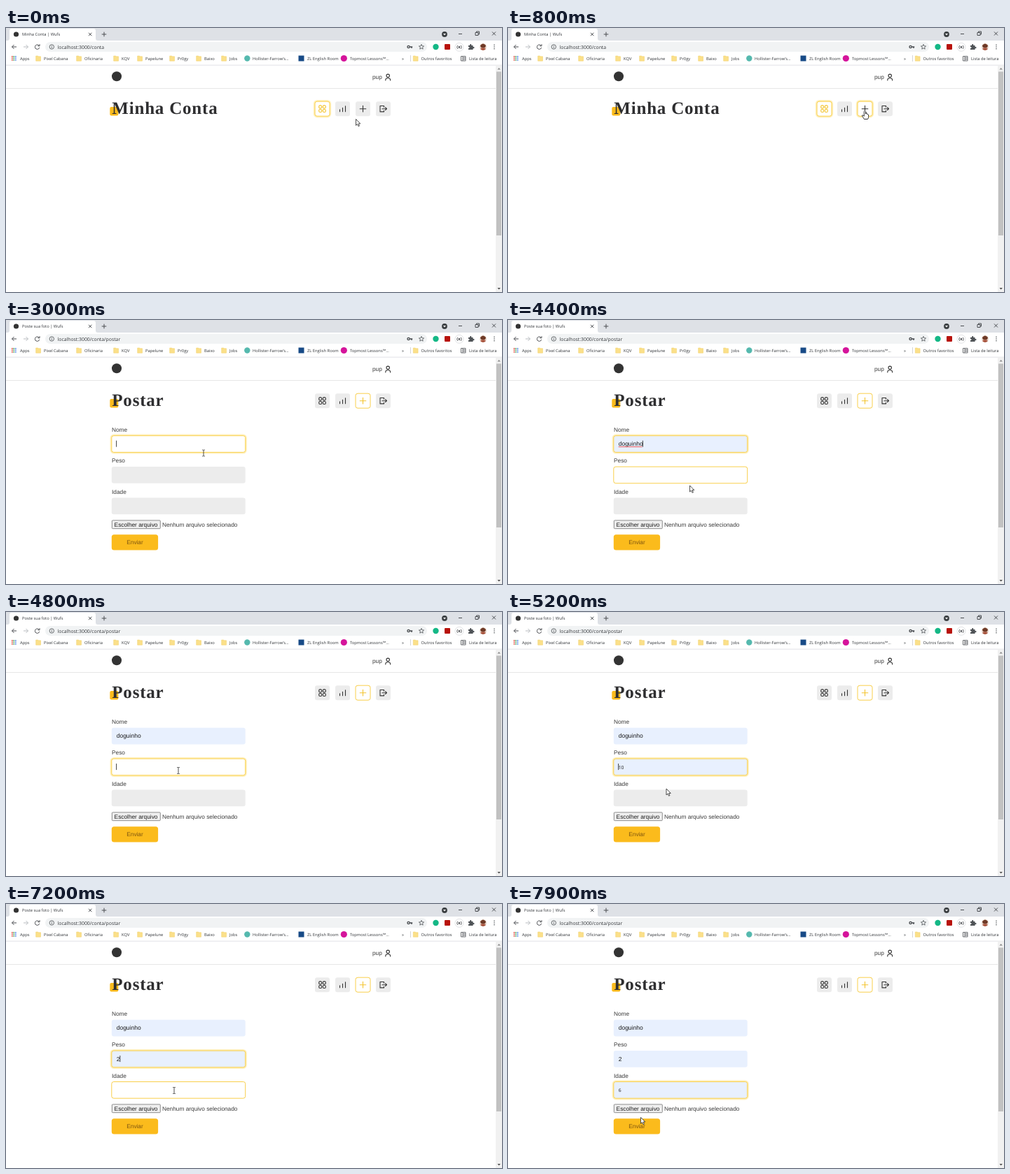
Animation, 708 px wide and 378 px high, one loop 8000 ms. Source, as an HTML page:

```html
<!DOCTYPE html>
<html lang="pt-BR">
<head>
<meta charset="utf-8">
<title>Minha Conta</title>
<style>
html, body { margin: 0; width: 100%; height: 100%; overflow: hidden; background: #fff; }
svg { display: block; width: 708px; height: 378px; }
text { text-rendering: geometricPrecision; white-space: pre; }
.ui { font: 5.8px "Open Sans", "Noto Sans", sans-serif; fill: #33363a; }
.url { font-size: 6.85px; }
.page { font: 8.3px "Liberation Sans", Arial, sans-serif; fill: #3a3a3a; }
.val { font-size: 8.5px; fill: #1a1a1a; }
.val.preview { font: 6.8px "Open Sans", "Noto Sans", sans-serif; }
.title { font: bold 25px "Liberation Serif", "Times New Roman", serif; letter-spacing: .8px; fill: #2e2e30; }
.line { fill: none; stroke: #4a4d51; stroke-width: 1; }
.thin { stroke-width: .8; }
.icon { fill: none; stroke: currentColor; stroke-width: 1.1; stroke-linecap: round; stroke-linejoin: round; }
.nav { color: #333; }
.nav .box, .field .box { fill: #ececec; }
.ring, .glow { fill: none; visibility: hidden; }
.ring { stroke: #f9cf4a; }
.glow { stroke: #fff0bd; stroke-width: 3; }
.hover .box, .focus .box, .active .box { fill: #fff; }
.auto .box { fill: #e8f0fe; }
.hover .ring, .focus .ring, .active .ring, .focus .glow { visibility: visible; }
.active { color: #f3c42f; }
.fading { color: #f7d06a; }
</style>
</head>
<body>
<svg viewBox="0 0 708 378">
  <rect width="708" height="378" fill="#fff"/>
  <rect width="708" height="18" fill="#dee1e6"/>
  <path d="M2 18Q5 18 5 15V4Q5 1 8 1H125Q128 1 128 4V15Q128 18 131 18Z" fill="#fff"/>
  <circle cx="14.5" cy="9" r="3.6" fill="#333"/>
  <text class="ui" id="tab" x="23" y="11.2"></text>
  <g class="line">
    <path d="M118 6.8l4.4 4.4m0-4.4l-4.4 4.4M136.7 9h6.6M140 5.7v6.6M646 8.5h5M670 6.5h4v4h-4zM671.5 6.5v-1.5h4v4h-1.5M694 5.5l5 5m0-5l-5 5"/>
    <path d="M15 27H8.5m3-3l-3 3 3 3"/>
    <path d="M25 27h6.5m-3-3l3 3-3 3" stroke="#b9bcc0"/>
    <path d="M47.2 25.3A3.2 3.2 0 1 0 47.7 28M48 23.2v2.6h-2.6"/>
  </g>
  <circle cx="626" cy="9" r="3.9" fill="#3c4043"/>
  <path d="M624 8h4l-2 2.6z" fill="#fff"/>
  <rect x="56" y="20" width="545" height="14" rx="7" fill="#f1f3f4"/>
  <g class="line thin">
    <circle cx="65.3" cy="27" r="3.2"/>
    <path d="M65.3 26.4v2.4M65.3 24.8v.8"/>
    <circle cx="574.6" cy="27" r="1.6" stroke-width="1.4"/>
    <path d="M576.2 27h4M579 27v2" stroke-width="1.4"/>
    <path d="M593 23.4l1 2.4 2.6.2-2 1.7.6 2.5-2.2-1.4-2.2 1.4.6-2.5-2-1.7 2.6-.2z"/>
  </g>
  <text class="ui url" id="url" x="73.6" y="29.5"></text>
  <circle cx="613.5" cy="27" r="4.2" fill="#15b886"/>
  <rect x="626" y="23" width="8" height="8" rx="1" fill="#b8120b"/>
  <circle cx="647" cy="27.3" r="6" fill="#fff" stroke="#d5d7da" stroke-width=".7"/>
  <text class="ui" x="647" y="29.2" text-anchor="middle" style="font-weight:bold">(x)</text>
  <path d="M660 25h2q-.5-2 1.2-2t1.2 2h2.2v2q2-.4 2 1t-2 1.2V31H660v-2q1.6.2 1.6-1T660 27z" fill="#4f5357"/>
  <circle cx="681" cy="27" r="5" fill="#ead9cd"/>
  <path d="M677 25q4-5 8 0l-1 3h-6z" fill="#6e3a27"/>
  <path d="M677 30q4-4 8 0-4 4-8 0" fill="#a8553f"/>
  <g fill="#4f5357"><circle cx="697" cy="24.3" r=".8"/><circle cx="697" cy="27" r=".8"/><circle cx="697" cy="29.7" r=".8"/></g>
  <g id="marks"></g>
  <circle cx="344.3" cy="43.5" r="4.2" fill="#55b9ae"/>
  <rect x="417.5" y="39.5" width="8" height="8" fill="#174a86"/>
  <circle cx="482.3" cy="43.5" r="4.6" fill="#d5149b"/>
  <path d="M577.5 39v9" stroke="#ccc" stroke-width=".8"/>
  <path class="line thin" d="M649.5 40.5h6.5v6.5h-6.5zM652 40.5V47M652 42.6h4M652 44.8h4"/>
  <path d="M0 53.2H708" stroke="#dadce0" stroke-width=".8"/>
  <path d="M0 86.5H699" stroke="#e6e6e6"/>
  <rect x="699" y="53.6" width="9" height="324.4" fill="#f1f1f1"/>
  <rect x="700" y="62.5" width="7" height="234.5" fill="#c1c1c1"/>
  <path d="M701.5 59.5l2.2-2.5 2.2 2.5z" fill="#8a8a8a"/>
  <path d="M701.5 372l2.2 2.5 2.2-2.5z" fill="#505050"/>

  <circle cx="158" cy="69.3" r="7" fill="#333"/>
  <text class="page" x="523" y="72.8">pup</text>
  <g class="icon" color="#333"><circle cx="545.2" cy="68.3" r="2.2"/><path d="M541.8 75v-.6q0-2.7 3.4-2.7t3.4 2.7v.6"/></g>
  <rect x="148.3" y="113" width="12" height="12.5" rx="2" fill="#fbbb1c"/>
  <text class="title" id="title" x="151.3" y="123"></text>
  <g id="nav"></g>
  <g id="form">
    <g id="fields"></g>
    <rect x="151.3" y="286.9" width="69" height="11.8" rx="1" fill="#efefef" stroke="#808080" stroke-width=".9"/>
    <text class="page" x="154.6" y="295.6" style="fill:#1a1a1a">Escolher arquivo</text>
    <text class="page" x="223" y="295.6">Nenhum arquivo selecionado</text>
    <rect x="150.8" y="307.2" width="66.3" height="22.3" rx="3.5" fill="#fbbb1c"/>
    <text class="page" x="184" y="321.4" text-anchor="middle" style="fill:#7d5510">Enviar</text>
  </g>
  <g id="pointer">
    <path id="arrow" d="M0 0V9L2 7.1 3.5 10.3 5 9.6 3.5 6.5H6.3Z" fill="#fff" stroke="#222" stroke-width=".8"/>
    <path id="hand" d="M-1.2 1Q0-.8 1 1V4.5Q2-.0 2.6 4.6 3.7 4 4 5.3 5.1 5 5.1 6.4V9Q5 10.5 4 12H-1.2Q-2 10-4 7.5-4.3 6-2.7 6.4L-1.2 7.7Z" fill="#fff" stroke="#222" stroke-width=".9" stroke-linejoin="round"/>
    <path id="beam" d="M-1.8-4.5H-.5L0-4 .5-4.5H1.8M0-4V4M-1.8 4.5H-.5L0 4 .5 4.5H1.8" fill="none" stroke="#222" stroke-width=".8"/>
  </g>
</svg>
<script>
const LOOP = 8000, TICK = 100;
const $ = id => document.getElementById(id);

// Bookmarks: label, text x, folder icon?
$('marks').innerHTML = [
  ['Apps', 20], ['Pixel Cabana', 54, 1], ['Oficinaria', 112, 1], ['KQV', 165, 1],
  ['Papelune', 199, 1], ['Pr0gy', 245, 1], ['Baixo', 283, 1], ['Jobs', 319, 1],
  ['Hollister-Farrow’s...', 352], ['ZL English Room', 430], ['Topmost Lessons™...', 491],
  ['»', 565], ['Outros favoritos', 592.6, 1], ['Lista de leitura', 661]
].map(([label, x, folder]) =>
  (folder ? `<path d="M${x - 11.3} 40h3l.6.8h3.2v6.4h-6.8z" fill="#fbe08a" stroke="#efcd62" stroke-width=".5"/>` : '') +
  `<text class="ui" x="${x}" y="45.6">${label}</text>`).join('');
for (let i = 0; i < 9; i++)
  $('marks').innerHTML += `<rect x="${8 + i % 3 * 2.5}" y="${40 + (i / 3 | 0) * 2.5}" width="1.6" height="1.6" fill="${['#e0483a', '#3f9b58', '#4d84e8'][i % 3]}"/>`;

// A filled box with the outlines it gets on hover and focus
const rect = (cls, x, y, w, h, r) => `<rect class="${cls}" x="${x}" y="${y}" width="${w}" height="${h}" rx="${r}"/>`;
const frameBox = (x, y, w, h) => rect('glow', x - .7, y - .7, w + 1.4, h + 1.4, 4) +
  rect('box', x, y, w, h, 3) + rect('ring', x, y, w, h, 3);

// Icons are drawn around the middle of a 21 px button
const tile = (x, y) => `<rect x="${x}" y="${y}" width="4" height="4" rx="1.5"/>`;
const icons = [
  tile(-4.8, -4.8) + tile(.8, -4.8) + tile(-4.8, .8) + tile(.8, .8),
  '<path d="M-4 4V1M0 4V-1.5M4 4V-4"/>',
  '<path d="M-4.3 0H4.3M0-4.3V4.3"/>',
  '<path d="M1-2.5V-4.2H-4.5V4.2H1V2.5M-1.5 0H5M3-2L5 0 3 2"/>'
];
$('nav').innerHTML = icons.map((icon, i) => `<g class="nav" id="nav${i}" transform="translate(${451.5 + i * 29} 115.7)">
  ${frameBox(-10.5, -10.5, 21, 21)}<g class="icon">${icon}</g></g>`).join('');

$('fields').innerHTML = ['Nome', 'Peso', 'Idade'].map((label, i) => {
  const y = 165.7 + i * 44.4;
  return `<text class="page" x="151" y="${y - 6}">${label}</text>
  <g class="field" id="field${i}" transform="translate(151 ${y})">
  ${frameBox(-.2, 0, 190.9, 23.7)}
  <text class="page val" x="6.7" y="14.5"></text>
  <path class="wave" d="M6.7 15.9H40.5" stroke="#e33" stroke-width=".8"/>
  <path class="caret" stroke="#111" stroke-width=".8"/></g>`;
}).join('');

// [time, classes, value, caret x, misspelt?]
const fields = [
  [[0, ''], [2600, 'hover'], [2800, 'focus'], [2900, 'focus', '', 6.6],
   [3500, 'focus auto preview', 'doguinho', 6.6], [3900, 'focus auto', 'doguinho', 41.4, 1],
   [4800, 'auto', 'doguinho']],
  [[0, ''], [4200, 'hover'], [4500, ''], [4600, 'hover'], [4800, 'focus', '', 6.6],
   [5000, 'focus auto preview', '10', 6.6], [5400, 'focus auto preview', '10'],
   [5700, 'focus auto preview', '10', 6.6], [5900, 'focus auto preview', '5', 6.6],
   [6300, 'focus auto preview', '2', 6.6], [6500, 'focus auto preview', '2'],
   [6800, 'focus auto', '2', 11.8], [7300, 'auto', '2']],
  [[0, ''], [7100, 'hover'], [7300, 'focus', '', 6.6],
   [7500, 'focus auto preview', '6', 6.6], [7900, 'focus auto preview', '6']]
];
const buttons = [
  [[0, 'active focus'], [2000, '']],
  [[0, '']],
  [[0, ''], [500, 'hover focus'], [2000, 'hover focus fading'], [2100, 'active focus'], [2800, 'active']],
  [[0, '']]
];
const shapes = [[0, 'arrow'], [500, 'hand'], [2200, 'arrow'], [2700, 'beam'], [3600, 'arrow'],
  [4200, 'beam'], [4400, 'arrow'], [4600, 'beam'], [4900, 'arrow'], [7100, 'beam'], [7500, 'arrow']];
const path = [[0, 499.5, 130.5], [100, 499, 133], [200, 499, 133], [300, 500, 131], [500, 506, 122],
  [800, 509.5, 118.5], [2000, 509.5, 118.5], [2200, 480, 130], [2400, 400, 152], [2600, 315, 172],
  [2800, 281, 187], [3000, 282, 190.5], [3400, 282, 190.5], [3500, 281, 194], [3700, 277, 201],
  [3800, 277, 201], [4000, 274, 205], [4400, 259.5, 237], [4600, 250, 226], [4800, 246, 227],
  [5200, 226, 253], [5300, 226, 253], [5400, 225.5, 252], [5600, 225.5, 252], [5900, 220, 288],
  [6000, 218, 304], [6200, 215, 298.5], [6300, 214, 310], [6700, 214, 310], [7000, 222, 288],
  [7200, 240, 267], [7600, 247, 267], [7700, 238, 276], [7800, 212, 292], [7900, 189.5, 305.5]];

const at = (list, t) => list.findLast(step => step[0] <= t);

function place(t) {
  const a = at(path, t), b = path[path.indexOf(a) + 1] || a;
  const k = a === b ? 0 : (t - a[0]) / (b[0] - a[0]);
  return [a[1] + (b[1] - a[1]) * k, a[2] + (b[2] - a[2]) * k];
}

function drawField(i, t) {
  const [, cls, value = '', caret, bad] = at(fields[i], t);
  const g = $('field' + i), text = g.querySelector('.val'), bar = g.querySelector('.caret');
  g.setAttribute('class', 'field ' + cls);
  text.setAttribute('class', 'page val ' + (cls.includes('preview') ? 'preview' : ''));
  text.textContent = value;
  bar.setAttribute('d', caret ? `M${caret} 7V16` : '');
  g.querySelector('.wave').style.display = bad ? '' : 'none';
}

function draw(t) {
  const posting = t >= 2000;
  $('title').textContent = posting ? 'Postar' : 'Minha Conta';
  $('tab').textContent = (t >= 2100 ? 'Poste sua foto' : 'Minha Conta') + ' | Wufs';
  $('url').textContent = 'localhost:3000/conta' + (posting ? '/postar' : '');

  const shown = posting ? 1 - .55 * Math.max(0, 1 - (t - 2000) / 200) ** 2 : 0;
  $('form').setAttribute('opacity', shown);
  $('form').setAttribute('transform', `translate(${-11 * (1 - shown)} 0)`);

  buttons.forEach((list, i) => $('nav' + i).setAttribute('class', 'nav ' + at(list, t)[1]));
  fields.forEach((_, i) => drawField(i, t));

  const shape = at(shapes, t)[1];
  for (const id of ['arrow', 'hand', 'beam']) $(id).style.display = id === shape ? '' : 'none';
  $('pointer').setAttribute('transform', `translate(${place(t).join(' ')})`);
}

const start = performance.now();
let last = -1;
function frame() {
  const t = Math.floor((performance.now() - start) % LOOP / TICK) * TICK;
  if (t !== last) draw(last = t);
  requestAnimationFrame(frame);
}
frame();
</script>
</body>
</html>
```
